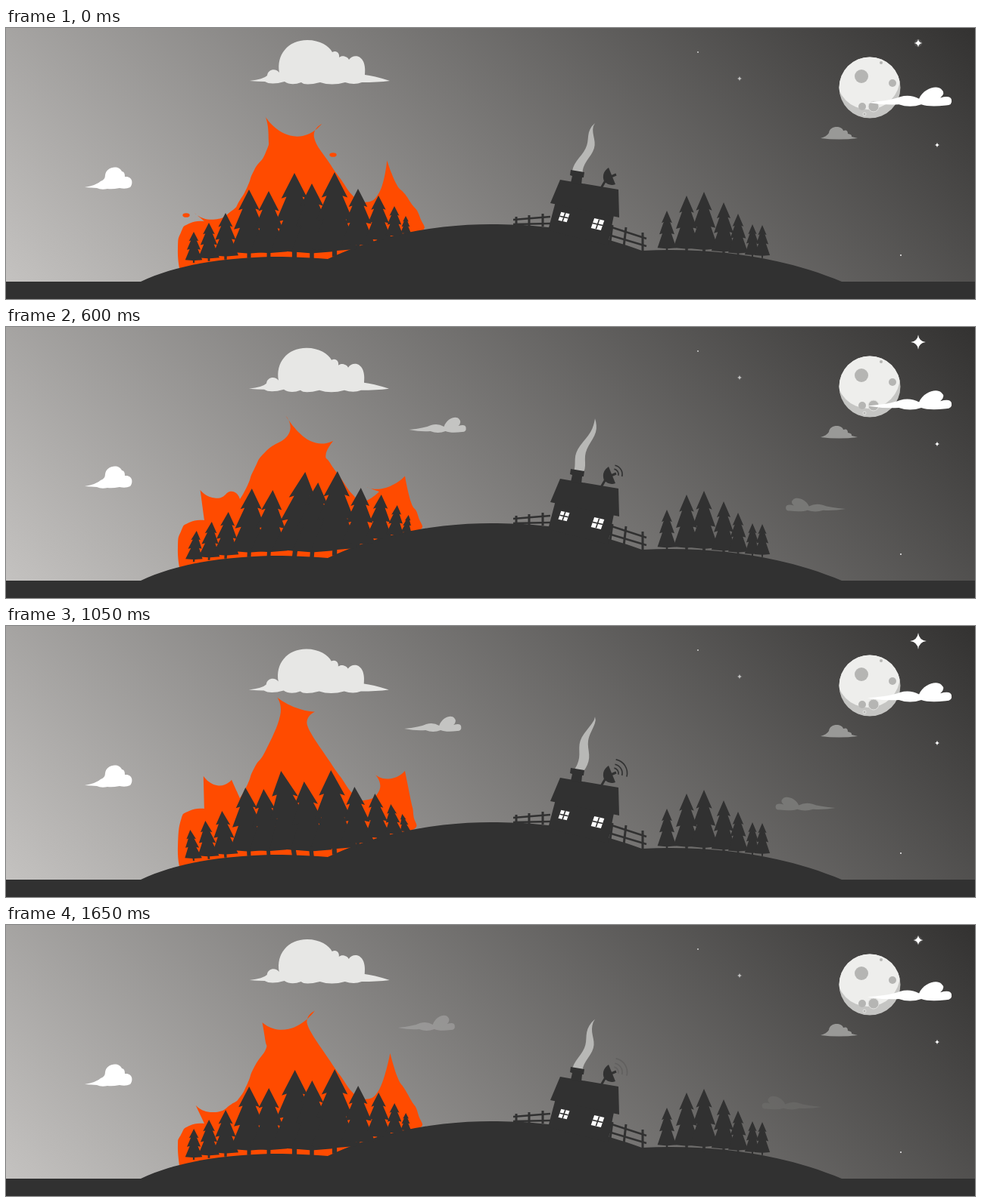
Animation, 1280 px wide and 359 px high, one loop 1800 ms. Source, as an HTML page:

```html
<!DOCTYPE html>
<html lang="en">
<head>
<meta charset="utf-8">
<title>Forest fire</title>
<style>
  html, body { margin: 0; width: 100%; height: 100%; overflow: hidden; }
  body { background: linear-gradient(45deg, #c6c4c2, #333231); }
  svg { display: block; width: 1280px; height: 359px; }
  .dark { fill: #313131; }
  .line { fill: none; stroke: #313131; }
</style>
</head>
<body>
<svg viewBox="0 0 1280 359">
  <defs>
    <path id="wisp" d="M0 17Q20 15 29 11Q38 8 46 13C50 2 62-2 66 3Q70 7 65 12Q74 9 75 14Q76 20 70 20Q55 22 48 19Q38 23 28 19Q15 20 0 17Z"/>
    <path id="fir" d="M0-1L.28-.7L.17-.72L.4-.42L.24-.44L.5-.09L.05-.07V0H-.05V-.07L-.5-.09L-.24-.44L-.4-.42L-.17-.72L-.28-.7Z"/>
    <path id="star" d="M0-1Q.1-.1 1 0Q.1.1 0 1Q-.1.1-1 0Q-.1-.1 0-1Z"/>
    <clipPath id="disc"><circle cx="1141" cy="79" r="40.5"/></clipPath>
  </defs>

  <g fill="#fff">
    <circle cx="1205" cy="20" r="5" opacity=".12"/>
    <use id="bigStar" href="#star"/>
    <use href="#star" transform="translate(1230 155) scale(3.5)"/>
    <use href="#star" transform="translate(969 67) scale(3.5)" opacity=".65"/>
    <circle cx="914" cy="32" r=".9" opacity=".8"/>
    <circle cx="1182" cy="301" r=".9"/>
  </g>

  <g clip-path="url(#disc)">
    <circle cx="1141" cy="79" r="41" fill="#c5c5c3"/>
    <circle cx="1139" cy="66" r="42" fill="#eeeeec"/>
  </g>
  <g fill="#b5b5b3">
    <circle cx="1130" cy="64" r="9"/>
    <circle cx="1171" cy="73" r="5"/>
    <circle cx="1156" cy="46" r="2"/>
    <circle cx="1131" cy="104" r="5"/>
    <circle cx="1146" cy="104" r="7" stroke="#e4e4e2"/>
    <circle cx="1134" cy="114" r="2" stroke="#e4e4e2"/>
  </g>
  <use id="moonCloud" href="#wisp" fill="#fff"/>
  <path fill="#999997" d="M1076 146Q1084 144 1087 139C1088 129 1104 129 1106 136Q1112 134 1112 140Q1118 141 1117 144L1125 146Q1100 149 1076 146Z"/>
  <path fill="#fff" d="M104 211Q120 208 125 203Q131 201 131 195C132 183 150 181 153 190Q157 190 157 197C168 196 168 207 164 211Q158 214 150 212Q140 214 134 213Q126 215 120 212Z"/>
  <use id="midCloud" href="#wisp" fill="#c4c4c2"/>
  <use id="lowCloud" href="#wisp" fill="#787876"/>

  <g id="embers" fill="#ff4b00"><path id="fire"/></g>
  <path id="bigCloud" fill="#e7e7e5" d="M322 70Q340 68 345 63C346 54 357 53 361 59C357 36 372 16 398 16C415 16 427 24 431 32C437 29 441 34 440 39C445 35 452 39 453 42C459 33 477 35 474 62Q485 63 507 70Q490 72 470 72Q460 76 448 72Q430 77 415 72Q395 77 390 72Q377 77 368 71Q350 76 342 71Q333 71 322 70Z"/>
  <path id="smoke" fill="#b8b8b6"/>

  <g class="dark">
    <path d="M0 336H178C230 311 300 303 365 303Q400 304 425 306C500 270 580 260 640 260C720 260 770 270 840 295C940 290 1030 305 1104 336H1280V359H0Z"/>
    <g id="trees"></g>
    <path d="M726 230L716 268L795 288L803 248Z"/>
    <path d="M732 201L809 214L810 251L719 232Z"/>
    <path d="M746 188L764 191L763 198L761 198L760 208L746 205L748 196L745 195Z"/>
    <path d="M796 185Q786 192 790 203Q797 210 805 207Z"/>
  </g>
  <g class="line" stroke-width="3">
    <path d="M786 212L792 202M799 197L806 194"/>
    <path d="M674 250V263M691 248V263M709 246V263M801 261L798 283M819 264L816 290M841 271V296"/>
    <path stroke-width="2.4" d="M670 254L719 250M670 260L719 259M797 263L846 279M796 274L846 289"/>
  </g>
  <g id="windows"></g>
  <g id="signal" class="line" stroke-width="1.6"></g>
</svg>
<script>
const LOOP = 1800, STEPS = 12;
const $ = id => document.getElementById(id);
const clamp = v => Math.max(0, Math.min(1, v));

function add(parent, tag, attributes) {
  const node = document.createElementNS("http://www.w3.org/2000/svg", tag);
  for (const name in attributes) node.setAttribute(name, attributes[name]);
  return $(parent).appendChild(node);
}

function place(node, transform, opacity = 1) {
  node.setAttribute("transform", transform);
  node.setAttribute("opacity", opacity);
}

// Smooth curve through the points; sharp turns stay pointed
function smooth(points) {
  const tangents = points.map((p, i) => {
    const a = points[i - 1], b = points[i + 1];
    if (!a || !b) return [0, 0];
    const [ux, uy, vx, vy] = [p[0] - a[0], p[1] - a[1], b[0] - p[0], b[1] - p[1]];
    const u = Math.hypot(ux, uy), v = Math.hypot(vx, vy);
    if (ux * vx + uy * vy < 0.25 * u * v) return [0, 0];
    const k = Math.min(u, v) / (u + v) / 1.5;
    return [(ux + vx) * k, (uy + vy) * k];
  });
  let d = "M" + points[0];
  for (let i = 1; i < points.length; i++) {
    const [p, q, s, t] = [points[i - 1], points[i], tangents[i - 1], tangents[i]];
    d += `C${p[0] + s[0]} ${p[1] + s[1]} ${q[0] - t[0]} ${q[1] - t[1]} ${q}`;
  }
  return d;
}

// Trees: x and top; the ground gives the base
const ground = x =>
  x < 430 ? 304 + (x - 360) ** 2 / 1800 :
  x < 640 ? 304 - (x - 430) * 0.31 : 296 + (x - 873) * 0.07;

const trees = [
  [248, 270], [268, 258], [290, 245], [321, 214], [347, 216], [381, 192],
  [404, 206], [434, 191], [465, 213], [492, 222], [513, 236], [528, 249],
  [873, 242], [899, 222], [922, 217], [948, 231], [967, 246], [986, 260], [999, 261]
].map(([x, top]) => ({
  x, base: ground(x), height: ground(x) - top,
  spread: x < 640 ? 0.55 : 0.46,
  give: x < 640 ? 5 + 14 * Math.exp(-(((x - 381) / 25) ** 2)) : 0,
  node: add("trees", "use", { href: "#fir" })
}));

for (const [x, y, size] of [[737, 250.5, 11.5], [781.5, 260, 13.5]]) {
  const h = size / 2, transform = `translate(${x} ${y}) rotate(13) skewX(-6)`;
  add("windows", "rect", { x: -h, y: -h, width: size, height: size, fill: "#fff", transform });
  add("windows", "path", { d: `M0 ${-h}V${h}M${-h} 0H${h}`, stroke: "#313131", "stroke-width": 1.6, transform });
}

const arcs = [[7, 0], [12, 250], [18.5, 850]].map(([r, start]) => ({
  start,
  node: add("signal", "path", {
    d: `M${802 + 0.2 * r} ${195 - 0.98 * r}A${r} ${r} 0 0 1 ${802 + 0.97 * r} ${195 + 0.25 * r}`
  })
}));

const embers = [[238, 248, 0], [432, 168, 0], [283, 207, 2], [513, 177, 6]].map(([cx, cy, peak]) => ({
  peak, node: add("embers", "ellipse", { cx, cy })
}));

// Two-horned flames whose tips swing; wave(peak) is 1 at the step `peak`
function drawFire(wave) {
  const pulse = wave(2, 2), flare = wave(6.5), lick = wave(10.5), lean = wave(3);
  const corner = 252 - 14 * pulse;
  const left = [[255 + 6 * flare, 222 - 24 * flare], [298, 223 - 20 * flare]];
  const plume = [[354 + 16 * wave(4.5), 106 - 23 * pulse], [417 + 18 * lean, 127 + 27 * lean]];
  const right = [[492 + 16 * lick, 191 - 22 * lick], [527, 205 - 15 * wave(6)]];
  const notch = ([a, b], sag) => [(a[0] + b[0]) / 2, (a[1] + b[1]) / 2 + sag];
  const below = ([x, y], dx, dy) => [x + dx, y + dy];
  $("fire").setAttribute("d", smooth([
    [229, 318], [227, 292], [231, corner + 12], [242, corner], [262, corner - 3],
    left[0], notch(left, 10), left[1], [309, 228],
    [319, 210], [328, 188], [343, 165], below(plume[0], 4, 24), plume[0],
    notch(plume, 14 + 10 * wave(1.5)), plume[1], below(plume[1], -10, 18),
    [428, 180], [442, 200], [458, 222],
    [472, 231], [493, 218], right[0], notch(right, 8), right[1],
    [535, 232], [543 + 5 * wave(1.5), 250], [543 + 6 * wave(1.5), 270], [400, 330]
  ]) + "Z");
  for (const { peak, node } of embers) {
    const r = Math.max(0, (wave(peak) - 0.87) * 36);
    node.setAttribute("rx", r);
    node.setAttribute("ry", r * 0.6);
  }
}

function drawTrees(step, wave) {
  const gust = Math.sin(Math.PI * step / STEPS) ** 2 * wave(4, 2);
  for (const { x, base, height, spread, give, node } of trees)
    place(node, `matrix(${height * spread} 0 ${-give * gust} ${height} ${x} ${base})`);
}

// A tapering column with a wave travelling up it
function drawSmoke(rise, turn) {
  const tip = 126 - 7 * rise, sides = [[], []];
  for (let u = 0; u <= 1; u += 1 / 16) {
    const bend = 4.5 * Math.sqrt(Math.sin(Math.PI * u)) * Math.sin(2 * Math.PI * (u - 0.28) / 0.96 - turn);
    const x = 755.5 + 22.5 * u + bend, y = 193 + (tip - 193) * u, half = 6.8 * (1 - u ** 2.5);
    sides[0].push([x - half, y]);
    sides[1].unshift([x + half, y]);
  }
  $("smoke").setAttribute("d", "M" + sides.flat().join("L") + "Z");
}

function draw(step) {
  const t = step * LOOP / STEPS, turn = 2 * Math.PI * step / STEPS;
  const wave = (peak, cycles = 1) => Math.cos(2 * Math.PI * cycles * (step - peak) / STEPS);
  const rise = 1 - Math.abs(1 - 2 * step / STEPS);
  const fade = clamp(t / 500) * clamp((LOOP - t) / 430);
  drawFire(wave);
  drawTrees(step, wave);
  drawSmoke(rise, turn);
  place($("bigCloud"), `translate(${-1.5 * rise} ${17.5 * rise})`);
  place($("bigStar"), `translate(1205 20) scale(${5.5 + 6.5 * rise})`);
  place($("moonCloud"), `translate(1138 ${77.5 + 6.5 * Math.sin(turn)}) scale(1.48 1.25)`);
  place($("midCloud"), `translate(${541 - 0.0141 * t} 119)`, fade);
  place($("lowCloud"), `translate(${1127 - 0.03 * t} 226) scale(-1.05 .88)`, fade);
  for (const { start, node } of arcs)
    node.setAttribute("opacity", clamp((t - start) / 200) * clamp((LOOP - 90 - t) / 300));
}

function tick() {
  draw(Math.floor(performance.now() % LOOP / LOOP * STEPS));
  requestAnimationFrame(tick);
}
tick();
</script>
</body>
</html>
```
